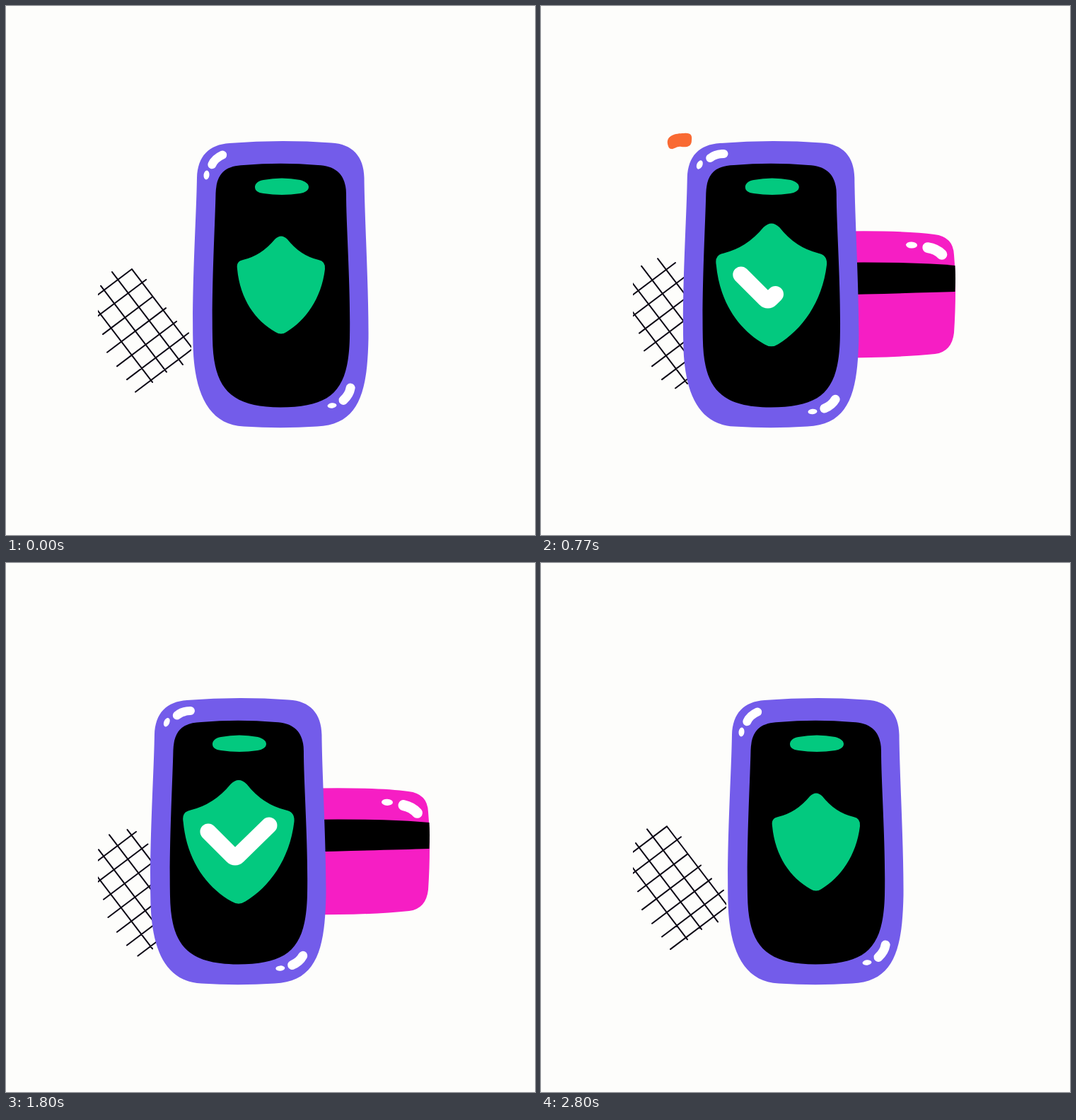
Recreate the animation shown at these times as an HTML page. Size 748 px wide and 748 px high, loop 2.83 s.

```html
<!DOCTYPE html>
<html lang="en">
<head>
<meta charset="utf-8">
<title>Secure payment</title>
<style>
html, body { margin: 0; width: 100%; height: 100%; overflow: hidden; background: #fdfdfb; }
svg { display: block; width: 100vw; height: 100vh; }
.shine { fill: none; stroke: #fff; stroke-linecap: round; }
</style>
</head>
<body>
<svg viewBox="0 0 748 748">
  <defs>
    <clipPath id="gridArea"><rect x="130" y="300" width="132" height="320"/></clipPath>
    <path id="bean" d="M-17 4C-19 -8 -6 -11 6 -11C16 -12 18 -8 17 -1C17 8 10 9 2 8C-4 7 -8 12 -12 11C-15 11 -16 8 -17 4Z"/>
  </defs>
  <g clip-path="url(#gridArea)">
    <path id="grid" fill="none" stroke="#0a0514" stroke-width="2" stroke-linecap="round"/>
  </g>
  <g id="rays" stroke="#fbd20a" stroke-width="18" stroke-linecap="round"></g>
  <g id="card">
    <path fill="#f61ec4" d="M400 319Q510 316.5 556 323Q583 326 584 352Q588 400 584 462Q581 489 557 492Q500 498 400 497.5Z"/>
    <path d="M400 363Q520 361 585.5 367Q586.5 385 585.5 404Q520 406 400 409Z"/>
    <path id="cardShine" class="shine" stroke-width="15" d="M-11 -1Q1 -3 11 2"/>
    <ellipse id="cardDot" rx="8" ry="4.6" fill="#fff"/>
  </g>
  <g id="phone">
    <path fill="#735cea" d="M270 243C271 212 287 196 316 194Q388 188.5 460 193.5C490 195 506 213 506.5 243C507 300 513 400 512.5 470C511 545 500 592 440 594.5Q388 598 336 594.5C285 592 266 545 264.5 480C262.5 400 269 300 270 243Z"/>
    <path d="M296.5 265C297.5 236 310.5 226 336 225Q388 220.5 441 225C468 226 481 240 481 266C481 310 487.5 400 486 470C484 545 460 567 388 567.5C316 567 293 540 292 470C290.5 400 295.5 310 296.5 265Z"/>
    <g fill="#03c97f">
      <path d="M364 246Q390 241 416 246C423 248 428 251 428 256S422 264 416 265Q390 269 364 265C356 264 352 261 352 256S357 247 364 246Z"/>
      <path id="shield" d="M380 330Q389 321 398 330Q416 353 442 359Q452 361 451 372C446 414 423 445 396.5 461Q389 466 381 461C353 445 331 415 327 372Q325 361 335 359Q361 353 380 330Z"/>
    </g>
    <path id="check" class="shine" stroke-width="23" stroke-linejoin="round" pathLength="100" d="M346 380L380 414Q384 418 388 414L432 371"/>
    <path id="topShine" class="shine" stroke-width="12" d="M-10 2Q-2 -3 10 -1"/>
    <ellipse id="topDot" rx="4" ry="6.5" fill="#fff"/>
    <path id="lowShine" class="shine" stroke-width="13" d="M-10 0Q1 3 10 -1"/>
    <ellipse id="lowDot" rx="6.5" ry="3.7" fill="#fff"/>
  </g>
  <use id="orange" href="#bean" fill="#f96a33"/>
  <use id="teal" href="#bean" fill="#05c293"/>
  <use id="outline" href="#bean" fill="none" stroke="#221c26" stroke-width="1.5"/>
</svg>
<script>
const LOOP = 2830;
const $ = id => document.getElementById(id);
const lerp = (a, b, k) => a + (b - a) * k;
const clamp = x => Math.min(1, Math.max(0, x));
const span = (t, a, b) => clamp((t - a) / (b - a));
const cubic = u => u < .5 ? 4 * u ** 3 : 1 - 4 * (1 - u) ** 3;
const smooth = u => u * u * (3 - 2 * u);
const outQuad = u => 1 - (1 - u) ** 2;
const pulse = (t, ease, a, b, c, d) => ease(span(t, a, b)) - ease(span(t, c, d));

function place(el, x, y, turn = 0, scale = 1) {
  $(el).setAttribute('transform', `translate(${x} ${y}) rotate(${turn}) scale(${scale})`);
}

// Blend between two [x, y, angle] poses.
function blend(el, a, b, k) {
  place(el, ...a.map((v, i) => lerp(v, b[i], k)));
}

// steep: start x closed, start x open, end x
const steep = [[126, 128, 207], [134, 128, 227], [150, 142, 250], [178, 165, 263]];
// rising: height at x = 170, start x closed/open, end x closed/open
const rising = [[377.5, 128, 128, 178, 190], [407.5, 128, 128, 198, 203],
  [438.6, 137, 139, 207, 212], [468.8, 143, 146, 226, 226], [499, 157, 157, 241, 241],
  [528.3, 171, 171, 258, 258], [555, 183, 190, 263, 263]];

function drawGrid(t) {
  const q = pulse(t, smooth, 80, 560, 1630, 1970);
  const segment = (a, b, y) => `M${a} ${y(a)}L${b} ${y(b)}`;
  const lines = steep.map(([a, b, end], i) =>
    segment(lerp(a, b, q), end, x => 430.5 + 1.31 * (x - 130 - 31 * i + 1.6 * q)));
  rising.forEach(([height, a, b, c, d]) => lines.push(
    segment(lerp(a, b, q), lerp(c, d, q), x => height - .755 * (x - 170))));
  $('grid').setAttribute('d', lines.join(''));
  place('grid', 0, 5.5 - 7.5 * Math.cos(2 * Math.PI * (t - 385) / LOOP));
}

const rays = [[14, 0], [-42, 17], [-84, 12]].map(([angle, lag]) => {
  const line = document.createElementNS('http://www.w3.org/2000/svg', 'line');
  line.setAttribute('transform', `translate(425 240) rotate(${angle})`);
  $('rays').append(line);
  return { line, lag };
});

function drawRays(t) {
  for (const { line, lag } of rays) {
    const tip = 170 * smooth(span(t, 170, 590)) - lag;
    const tail = 170 * smooth(span(t, 250, 650)) - lag;
    line.setAttribute('x1', Math.min(tail, tip));
    line.setAttribute('x2', tip);
    line.setAttribute('stroke-width', 18 * (1 - span(t, 560, 650)));
    line.style.display = t > 170 && t < 650 ? '' : 'none';
  }
}

// A bean pops up as a round dot, then lengthens while it turns level.
function drawBean(el, x, y, t, start, end) {
  const grow = outQuad(span(t, start, start + 350)) * (1 - smooth(span(t, end - 220, end)));
  const turn = lerp(-70, 0, cubic(span(t, start, start + 600)));
  place(el, x, y, turn, `${grow} ${Math.sqrt(grow)}`);
  $(el).style.display = grow > 0 ? '' : 'none';
}

const cardKeys = [[60, -110], [330, -2], [480, 13], [720, 0], [1500, 0], [1800, 13], [2040, -110]];

function cardX(t) {
  const i = cardKeys.findIndex(key => key[0] > t);
  if (i < 1) return -110;
  const [a, from] = cardKeys[i - 1], [b, to] = cardKeys[i];
  return lerp(from, to, smooth(span(t, a, b)));
}

function render(t) {
  const open = pulse(t, cubic, 25, 499, 1691, 2165);
  place('phone', -63.2 * open, 0);
  blend('topShine', [298.5, 217, -34], [312, 211.5, -9], open);
  blend('topDot', [283.5, 239, 6], [287.5, 224.5, 24], open);
  blend('lowShine', [482.5, 549, -57], [472, 563, -37], open);
  blend('lowDot', [461, 565, -6], [447.2, 573.5, -4], open);

  const swing = Math.min(1 - open, .3);
  place('card', cardX(t), 0);
  place('cardShine', 557 + 38 * swing, 346 + 30 * swing, 18 + 65 * swing);
  place('cardDot', 524 + 40 * swing, 338 + 6 * swing, 3);

  const scale = 1 + .265 * pulse(t, smooth, 430, 800, 2230, 2600);
  $('shield').setAttribute('transform',
    `translate(388.7 395) scale(${scale}) translate(-388.7 -395)`);
  const drawn = 100 * pulse(t, smooth, 590, 925, 2180, 2480);
  $('check').setAttribute('stroke-dasharray', `${drawn} 200`);
  $('check').style.display = drawn > .1 ? '' : 'none';

  drawGrid(t);
  drawRays(t);
  drawBean('orange', 196, 191, t, 200, 1040);
  $('orange').setAttribute('opacity', lerp(.5, 1, span(t, 200, 480)));
  drawBean('teal', 187, 606, t, 1160, 1660);
  drawBean('outline', 604, 496, t, 1935, 2660);
}

const begin = performance.now();
function tick() {
  render((performance.now() - begin) % LOOP);
  requestAnimationFrame(tick);
}
tick();
</script>
</body>
</html>
```
